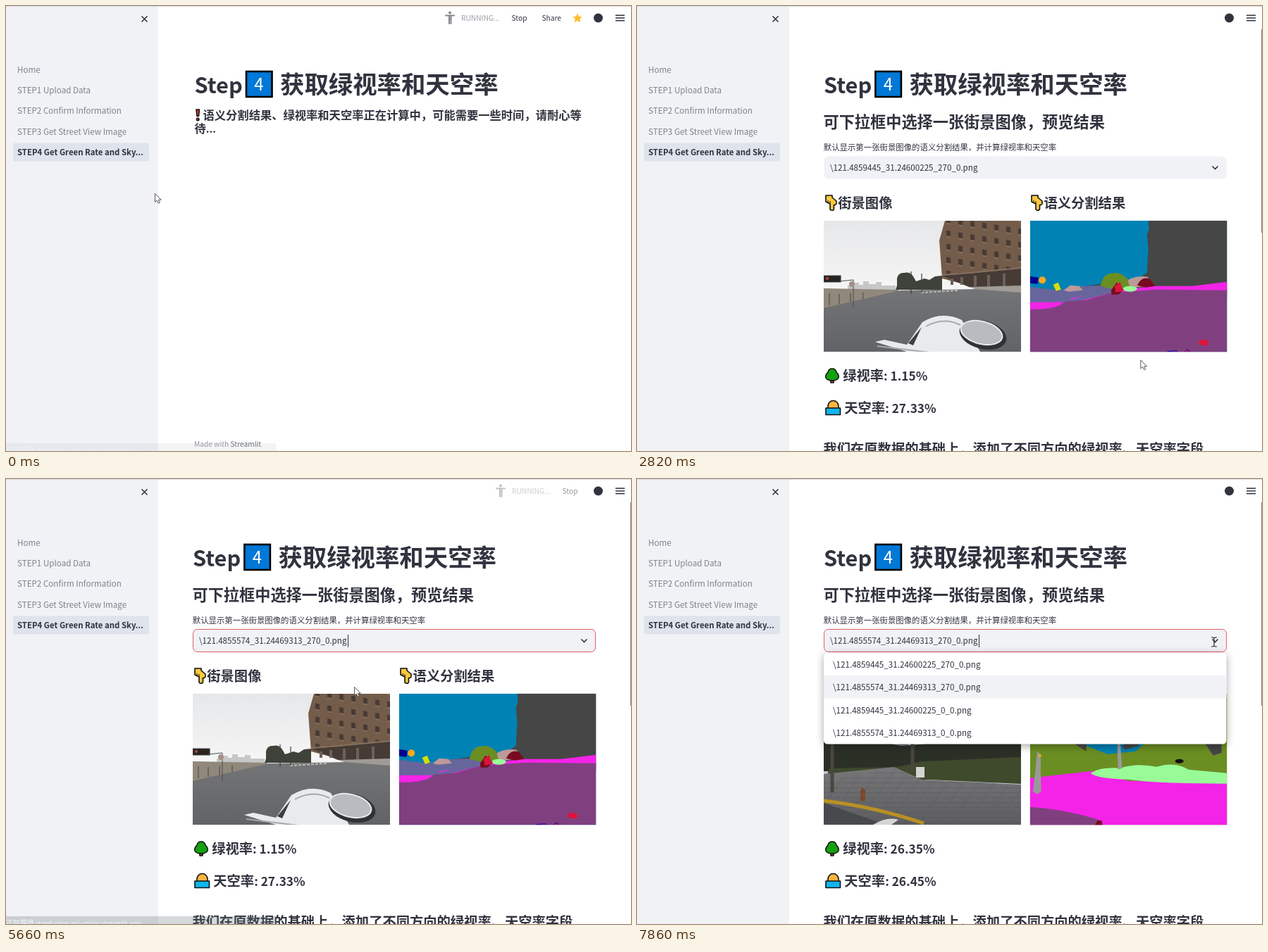
An HTML page that plays this animation: 887 px wide and 632 px high, repeating every 8 s.

```html
<!DOCTYPE html>
<html lang="zh">
<head>
<meta charset="utf-8">
<style>
html, body { margin: 0; width: 100%; height: 100%; overflow: hidden; background: #fff }
svg { display: block }
text { font-family: "Noto Sans CJK SC", "Noto Sans CJK JP", sans-serif; fill: #31333f; white-space: pre }
.h1 { font-size: 34.4px; font-weight: 700 }
.h3 { font-size: 22.2px; font-weight: 700 }
.h4 { font-size: 19.3px; font-weight: 700 }
.h5 { font-size: 16.3px; font-weight: 700 }
.zh { font-size: 13px }
.label { font-size: 11.4px }
.body { font-size: 11.64px }
.small { font-size: 10.2px }
.latin { font-size: .895em }
.nav text { fill: #7f828c }
.pale, .pale text { fill: #9b9da5 }
.end { text-anchor: end }
.code { font-weight: 700; fill: #0a7d14 }
.ink { stroke: #111; stroke-width: 1.6; stroke-linejoin: round }
.line { fill: none; stroke: #31333f; stroke-width: 1.6 }
.pose { fill: none; stroke: #84868c; stroke-width: 2; stroke-linecap: round; stroke-linejoin: round }
</style>
</head>
<body>
<svg id="stage" width="887" height="632" viewBox="0 0 887 632">
<defs>
  <linearGradient id="sky" x2="0" y2="1"><stop stop-color="#e6e7e9"/><stop offset=".5" stop-color="#f5f5f5"/></linearGradient>
  <linearGradient id="road" x2="0" y2="1"><stop stop-color="#747577"/><stop offset="1" stop-color="#626366"/></linearGradient>
  <linearGradient id="pave" x2="0" y2="1"><stop stop-color="#77777a"/><stop offset="1" stop-color="#5d5d60"/></linearGradient>
  <pattern id="windows" width="17" height="19" patternUnits="userSpaceOnUse" patternTransform="skewY(9)">
    <path d="M4 5h6v8h-6z" fill="#463a34"/><path d="M4 14h6" stroke="#93806c"/>
  </pattern>
  <pattern id="tiles" width="22" height="7" patternUnits="userSpaceOnUse" patternTransform="skewX(-35)">
    <path d="M0 0H22M0 0V7" fill="none" stroke="#505053" stroke-width=".7"/>
  </pattern>
  <g id="finger">
    <path class="ink" d="M1 1H10V4L16 9V13Q15 15 12.500 14.500V20Q12 23 9 22 7 22 7 20V13L1 10Z" fill="#ffc83d"/>
    <path d="M4 8v3M7 9v4" stroke="#111" fill="none"/>
  </g>
</defs>

<rect width="887" height="632" fill="#fff"/>
<rect width="216" height="632" fill="#f0f2f6"/>
<path d="M0 .5H887" stroke="#d6d9de"/>
<path class="line" d="M192.500 14.500l8 8m0-8l-8 8"/>
<rect x="10" y="194.500" width="193" height="26" rx="3" fill="#dfe3ec"/>
<g class="body nav">
  <text x="16" y="95">Home</text>
  <text x="16" y="124">STEP1 Upload Data</text>
  <text x="16" y="153.300">STEP2 Confirm Information</text>
  <text x="16" y="182.500">STEP3 Get Street View Image</text>
</g>
<text x="16" y="212" font-size="11.4" font-weight="700">STEP4 Get Green Rate and Sky...</text>

<g id="running">
  <g class="pose">
    <g class="p"><circle cx="630" cy="9.500" r="1" /><path d="M624 13.500H636M629 14V25M631.500 14V25M629 18h2"/></g>
    <g class="p"><circle cx="632.500" cy="9.300" r="1"/><path d="M625 16V13.500L630 12.500 632 15.500 636 17M630.500 13L629 19 632 21V25.500M629 18.500L628 22.500 623.500 22"/></g>
    <g class="p"><circle cx="629" cy="9.500" r="1"/><path d="M629 13L624 18M629 13L636 16M629 13V19L634 21 636 25M629 19L625 25"/></g>
    <g class="p"><circle cx="633" cy="9.500" r="1"/><path d="M632 13L628 18 633 20 632 24M628 18L624 23M631 13L626 14M624 25H637"/></g>
  </g>
  <text class="small pale" x="646" y="20.500">RUNNING...</text>
  <text class="small" x="717.500" y="20.500">Stop</text>
</g>
<g id="share">
  <text class="small" x="760.500" y="20.500">Share</text>
  <path d="M811 10.500l2 4.300 4.700.6-3.500 3.200.9 4.700-4.100-2.300-4.100 2.300.9-4.700-3.500-3.200 4.700-.6z" fill="#fbbe2b"/>
</g>
<circle cx="840.500" cy="17" r="6.500" fill="#31333f"/>
<path class="line" d="M865 13.200h13m-13 3.800h13m-13 3.800h13"/>

<g id="title">
  <text class="h1" x="267.500" y="124"><tspan class="latin">Step</tspan></text>
  <rect x="341" y="93" width="36.500" height="36" fill="#0078d7" stroke="#000" stroke-width="2.600"/>
  <text x="359" y="120" text-anchor="middle" font-size="24" style="fill:#fff">4</text>
  <text class="h1" x="389" y="124">获取绿视率和天空率</text>
</g>

<g id="waiting">
  <path class="ink" d="M270 147h4.500l-1 9.500h-2.500z" fill="#e03a2c"/>
  <circle class="ink" cx="272.200" cy="161" r="1.700" fill="#e03a2c"/>
  <text class="h5" x="279.500" y="161">语义分割结果、绿视率和天空率正在计算中，可能需要一些时间，请耐心等</text>
  <text class="h5" x="267.500" y="180.300">待<tspan class="latin">...</tspan></text>
  <text class="small pale" x="267" y="626">Made with <tspan style="fill:#6f727c">Streamlit</tspan></text>
</g>

<g id="results">
  <text class="h3" x="264.500" y="173.300">可下拉框中选择一张街景图像，预览结果</text>
  <text class="label" x="264.800" y="204.800">默认显示第一张街景图像的语义分割结果，并计算绿视率和天空率</text>
  <rect id="box" x="265.500" y="213.500" width="571" height="32" rx="6" fill="#f0f2f6"/>
  <text id="choice" class="body" x="274" y="234"></text>
  <path class="line" d="M816.500 227.500l4 4 4-4"/>
  <path id="caret" d="M485.500 221V239" stroke="#31333f"/>
  <use href="#finger" x="267" y="268"/>
  <text class="h4" x="285.300" y="287.200">街景图像</text>
  <use href="#finger" x="559" y="268"/>
  <text class="h4" x="577.500" y="287.200">语义分割结果</text>

  <svg id="photo1" x="265" y="305" width="280" height="186">
    <rect width="280" height="186" fill="url(#sky)"/>
    <path d="M34 99V92h8v-4h8v3h6v-5h8v4h10v-3h8v5h20v10z" fill="#c6c7c6"/>
    <path d="M104 92L104 82Q106 73 114 74 122 72 127 79L131 86 143 82 150 84 158 79 168 78V98H102z" fill="#3f4239"/>
    <path d="M172 0L164 28 168 82 206 92H280V0z" fill="#745c4a"/>
    <path d="M172 0L164 28 168 82 206 92H280V0z" fill="url(#windows)"/>
    <path d="M168 78L206 75 280 68V94L206 94z" fill="#463b35"/>
    <path d="M168 77L206 74 280 67" stroke="#85705e" fill="none" stroke-width="2"/>
    <path d="M182 82v9M196 80v11M215 78v15M234 77v16M256 75v18" stroke="#6d6259" stroke-width="4"/>
    <path d="M0 96L106 98V105L0 126z" fill="#91887c"/>
    <path d="M8 103v17M22 104v14M38 103v12M56 102v10" stroke="#5f5a54" stroke-width="1.500"/>
    <path d="M0 124L108 99 280 96V186H0z" fill="url(#road)"/>
    <path d="M206 94L280 92V102L215 97z" fill="#a09b95"/>
    <path d="M138 102l52-3" stroke="#b9b9b8" stroke-width="2" stroke-dasharray="4 2"/>
    <path d="M0 78h24v9H0zM124 72v32M139 75v27" fill="#29231f" stroke="#3e4142" stroke-width="1.200"/>
    <path d="M22 86L42 84V124" fill="none" stroke="#4d4e50"/>
    <circle cx="5" cy="82" r="2" fill="#b9473c"/><circle cx="40" cy="90" r="4" fill="#a38e87"/>
    <path d="M73 172L86 169 118 176 140 144Q168 127 196 141L222 186H118z" fill="#e9eaec"/>
    <path d="M120 174L139 151 127 177z" fill="#3c3e42"/>
    <path d="M76 178L150 187M145 150Q170 136 194 148" stroke="#a6a8ac" stroke-width="2" fill="none"/>
    <ellipse cx="226" cy="162" rx="34" ry="20" transform="rotate(14 226 162)" fill="#303236"/>
    <ellipse cx="224" cy="159" rx="30" ry="16" transform="rotate(14 224 159)" fill="#b9bbc1" stroke="#e8e8ea" stroke-width="2"/>
  </svg>
  <svg id="mask1" x="557.700" y="304.700" width="279.600" height="186.600">
    <rect width="280" height="187" fill="#0082b4"/>
    <path d="M168 0L169 12 166 20 168 40 166 74 155 82 100 90 60 96V110H280V0z" fill="#464646"/>
    <path d="M0 94L40 99 75 93 115 92 135 100 100 112 40 117 0 119z" fill="#66669c"/>
    <path d="M48 99l9-7 13 1 5 6-20 2zM137 86q12-9 30-6l8 12-35 4z" fill="#be9999"/>
    <path d="M100 93Q104 74 117 75 127 72 138 82L142 95 120 98z" fill="#6b8e23"/>
    <path d="M0 116L38 116 48 110 55 111 110 101 175 93 230 93 280 87V102L0 128z" fill="#f423e8"/>
    <path d="M40 116L48 108 60 112 110 97 125 100 60 117z" fill="#66669c"/>
    <path d="M0 126Q28 127 43 120L50 115 80 113 100 107 118 102 180 98 280 99V187H0z" fill="#804080"/>
    <path d="M0 79l12 2-1 9-11-1z" fill="#00008e"/>
    <circle cx="17.500" cy="84.500" r="5" fill="#faaa1e"/>
    <path d="M33 91l7-3 4 10-7 2z" fill="#dcdc00"/>
    <path d="M115 99l8-11 10 10-7 7h-10zM152 92q7-14 18-9l8 10-14 2z" fill="#770b20"/>
    <path d="M120 93l8-6 4 13-10 2zM239 172q6-6 15 0l-2 6-12-2z" fill="#dc143c"/>
    <ellipse cx="142" cy="97" rx="10" ry="4" fill="#98fb98"/>
    <path d="M195 186l12-1 3 1M220 186l3-3 4 3" stroke="#0000c0" fill="#dc143c"/>
  </svg>
  <svg id="photo2" x="265" y="305" width="280" height="186">
    <rect width="280" height="186" fill="#c2c8ce"/>
    <path d="M60 90V62h14V48h12v24h20V56h14v18h30V64h14v30zM240 90V50h24v40z" fill="#7d858c"/>
    <path d="M0 0H34Q62 16 48 42L72 66 110 74 160 70 196 48 230 32 262 4 280 0V110H0z" fill="#2b3027"/>
    <path d="M8 106L104 104 140 96 280 90V128L150 122 0 130z" fill="#3f4a2c"/>
    <path d="M0 114L100 104 140 122 280 129V186H0z" fill="url(#pave)"/>
    <path d="M0 124L100 106 140 122 280 129V186H0z" fill="url(#tiles)"/>
    <path d="M12 0V140M126 50V110" stroke="#4b463f" stroke-width="5"/>
    <path d="M0 155L88 186H0z" fill="#48494c"/>
    <path d="M0 152Q70 160 142 184" stroke="#b99022" stroke-width="5" fill="none"/>
    <path d="M131 104h12v15h-12z" fill="#d4d4d2"/>
    <path d="M52 153v-15l3-5 4 4v15z" fill="#7a4a2e"/>
    <path d="M70 186Q90 174 106 179L96 186z" fill="#d3d5d7"/>
  </svg>
  <svg id="mask2" x="557.700" y="304.700" width="279.600" height="186.600">
    <rect width="280" height="187" fill="#6b8e23"/>
    <path d="M44 0H225L196 38 168 66 150 82 110 86 64 68 48 40z" fill="#0082b4"/>
    <path d="M64 72l16-14v24zM130 74l20-8 5 8-20 6zM248 70l24-8v22l-12 4z" fill="#464646"/>
    <path d="M0 120L88 110 140 124 280 127V187H0z" fill="#f423e8"/>
    <path d="M86 113Q100 104 128 106 150 98 180 104 205 96 225 108L280 113V128Q180 128 140 122 95 121 86 113z" fill="#98fb98"/>
    <path d="M10 82q7 2 5 25l1 32-6 4-6-4 4-32zM124 70l4 0 3 36-6 2z" fill="#999"/>
    <ellipse cx="212" cy="96" rx="6" ry="3" fill="#111"/>
    <circle cx="14" cy="88" r="2" fill="#faaa1e"/>
    <path d="M0 161Q50 164 100 180V187H0z" fill="#804080"/>
    <path d="M92 187l4-7 6 1 1 6z" fill="#770b20"/>
  </svg>

  <g id="lower">
    <path class="ink" d="M275 343h4v6h-4z" fill="#8e562e"/>
    <path class="ink" d="M277 329q5 0 6 5 4 4 3 8-2 4-9 4t-9-4q-1-4 3-8 1-5 6-5z" fill="#13a10e"/>
    <text class="h4" x="292.200" y="346">绿视率<tspan id="green" class="latin"></tspan></text>
    <path class="ink" d="M271 386v-4a7.500 7.500 0 0 1 15 0v4z" fill="#f9b53f"/>
    <path class="ink" d="M268 385h20.500v9.500H268z" fill="#0fb5ee"/>
    <text class="h4" x="294.300" y="392">天空率<tspan id="skyRate" class="latin"></tspan></text>
    <text class="h4" x="264.500" y="450.300">我们在原数据的基础上，添加了不同方向的绿视率、天空率字段</text>
    <text class="zh" x="264.500" y="483.500">如：</text>
    <text class="body code" x="293" y="483.500">n_gre</text>
    <text class="zh" x="328" y="483.500">字段代表正北方向的绿视率，</text>
    <text class="body code" x="499.500" y="483.500">n_sky</text>
    <text class="zh" x="535" y="483.500">字段代表正北方向的天空率</text>
    <path d="M265 502H588V531H265zM265 531H307V589H265z" fill="#f8f9fb"/>
    <rect x="265.500" y="502.500" width="323" height="86" rx="3" fill="none" stroke="#e9eaee"/>
    <path d="M265 531.500H588M265 560.500H588M306.500 502V589M362.500 502V589M413.500 502V589M458.500 502V589M503.500 502V589M543.500 502V589" stroke="#e9eaee"/>
    <g id="table" class="small"></g>
    <text class="h4" x="264.500" y="635.300">如果您想获取所有街景图像的语义分割结果、绿视率和天空率</text>
  </g>
  <rect id="scrollbar" x="886" y="33" width="1" fill="#858585"/>
  <g id="menu">
    <rect x="265" y="246.500" width="571.500" height="130" rx="5" fill="#fff" style="filter:drop-shadow(0 3px 6px rgba(0,0,0,.35))"/>
    <rect id="hover" x="265" width="571.500" height="32.500" fill="#f0f2f6"/>
    <g id="options" class="body"></g>
  </g>
</g>

<g id="status">
  <path d="M0 621H380q4 0 4 4V632H0z" fill="#6a727a" opacity=".8"/>
  <text x="0" y="634" font-size="10" style="fill:#fff">正在等待 <tspan class="latin">street-view-aoi-spider.streamlit.app...</tspan></text>
</g>

<g id="cursor">
  <path id="arrow" d="M.5.5V12.500L3.300 10 5.300 14.200 7.300 13.300 5.400 9.300H9.200z" fill="#fff" stroke="#444" stroke-width=".9"/>
  <path id="hand" d="M-1 1Q.5-1 2 1V7L8 8.500Q9.500 9 9 12L7 16.500H0L-4.500 10.500Q-4 8.500-2.500 9.500L-1 10.500z" fill="#fff" stroke="#333" stroke-width=".9"/>
  <path id="beam" d="M-4-6H-1.500L0-5 1.500-6H4M0-5V6M-4 7H-1.500L0 6 1.500 7H4" fill="none" stroke="#222" stroke-width="1.200"/>
</g>
</svg>
<script>
const el = id => document.getElementById(id);
const show = (id, opacity) => {
  el(id).style.display = opacity > 0 ? '' : 'none';
  el(id).style.opacity = +opacity;
};
const move = (id, x, y) => el(id).setAttribute('transform', `translate(${x} ${y})`);
const put = (id, text) => { if (el(id).textContent !== text) el(id).textContent = text; };
const ramp = (t, a, b) => Math.min(1, Math.max(0, (t - a) / (b - a)));
const during = (t, a, b) => t >= a && t < b;

const addText = (parent, x, y, text, cls = '') => {
  const node = document.createElementNS('http://www.w3.org/2000/svg', 'text');
  node.setAttribute('x', x);
  node.setAttribute('y', y);
  node.setAttribute('class', cls);
  node.textContent = text;
  el(parent).append(node);
};

const files = ['270', '0'].flatMap(angle =>
  ['121.4859445_31.24600225', '121.4855574_31.24469313'].map(place => `\\${place}_${angle}_0.png`));
files.forEach((file, i) => addText('options', 278, 267.5 + 32.5 * i, file));

const starts = [0, 313, 369, 419, 464, 509, 550], ends = [299, 355.5, 406, 451, 496, 536, 581];
' lng lat w_gre w_sky n_gre n_sky'.split(' ').forEach((s, i) => addText('table', starts[i], 520.5, s, 'pale'));
['0 121.4856 31.2447 0.2635 0.2645 0.116 0.2409', '1 121.4859 31.246 0.0115 0.2733 0 0.06'].forEach((row, r) =>
  row.split(' ').forEach((s, i) => addText('table', ends[i], 549.5 + 28.5 * r, s, i ? 'end' : 'end pale')));

// Pointer stops: time, x, y
const path = [
  [0, 211, 266], [480, 247, 226.5], [2620, 247, 226.5], [2760, 560, 571], [2890, 900, 420],
  [3170, 900, 290], [3240, 876, 262], [3630, 815, 231], [4360, 815, 231], [4800, 322, 285],
  [5190, 494, 295], [6710, 494, 295], [7470, 819, 231], [8000, 819, 231]
];
function pointer(t) {
  const i = path.findIndex(p => p[0] > t);
  const [t0, x0, y0] = path[i - 1], [t1, x1, y1] = path[i];
  const k = ramp(t, t0, t1), ease = k * k * (3 - 2 * k);
  return [x0 + (x1 - x0) * ease, y0 + (y1 - y0) * ease];
}

const poses = document.querySelectorAll('.p');

function draw(t) {
  const ready = t >= 1820, second = t >= 5250, updated = t >= 5700;
  const first = during(t, 1960, 5700), next = t >= 5960, loaded = first || next;
  const open = during(t, 4030, 5250) ? ramp(t, 3990, 4170) : ramp(t, 7590, 7800);

  show('waiting', !ready);
  show('results', ready);
  move('title', ready ? -2.6 : 0, 0);

  show('running', t < 3000 ? 1 - ramp(t, 2000, 2130) : during(t, 5590, 5850) * .5);
  move('running', t < 3000 ? 0 : 72, 0);
  const pose = Math.floor((t + 125) / 200) % 4;
  poses.forEach((p, i) => p.style.display = i === pose ? '' : 'none');
  show('share', t < 2760);

  put('choice', files[+second]);
  put('green', updated ? ': 26.35%' : ': 1.15%');
  put('skyRate', updated ? ': 26.45%' : ': 27.33%');
  const red = ramp(t, 3930, 4100);
  el('box').setAttribute('stroke', `rgba(226,92,100,${red})`);
  show('caret', t >= 3955 && (t < 4730 || Math.floor((t - 5260) / 530) % 2 === 0));

  show('photo1', first);
  show('mask1', first && t >= 2690);
  show('photo2', next);
  show('mask2', next);
  move('lower', 0, loaded ? 186 : 0);
  show('scrollbar', !during(t, 4430, 5250));
  el('scrollbar').setAttribute('height', loaded ? 289 : 346);

  const [x, y] = pointer(t);
  const inBox = ready && x > 265 && x < 837 && during(y, 213, 246);
  const inMenu = open > 0 && y >= 246;
  move('cursor', x, y);
  show('hand', inMenu);
  show('beam', inBox);
  show('arrow', !inBox && !inMenu);

  show('menu', open);
  const row = inMenu ? Math.min(3, Math.floor((y - 246.5) / 32.5)) : +second;
  el('hover').setAttribute('y', 246.5 + 32.5 * Math.max(0, row));
  show('status', t < 480 ? .1 * (1 - t / 480) : Math.min(ramp(t, 5590, 5800), 1 - ramp(t, 5930, 5990)));
}

function tick() {
  draw(performance.now() % 8000);
  requestAnimationFrame(tick);
}
tick();
</script>
</body>
</html>
```
